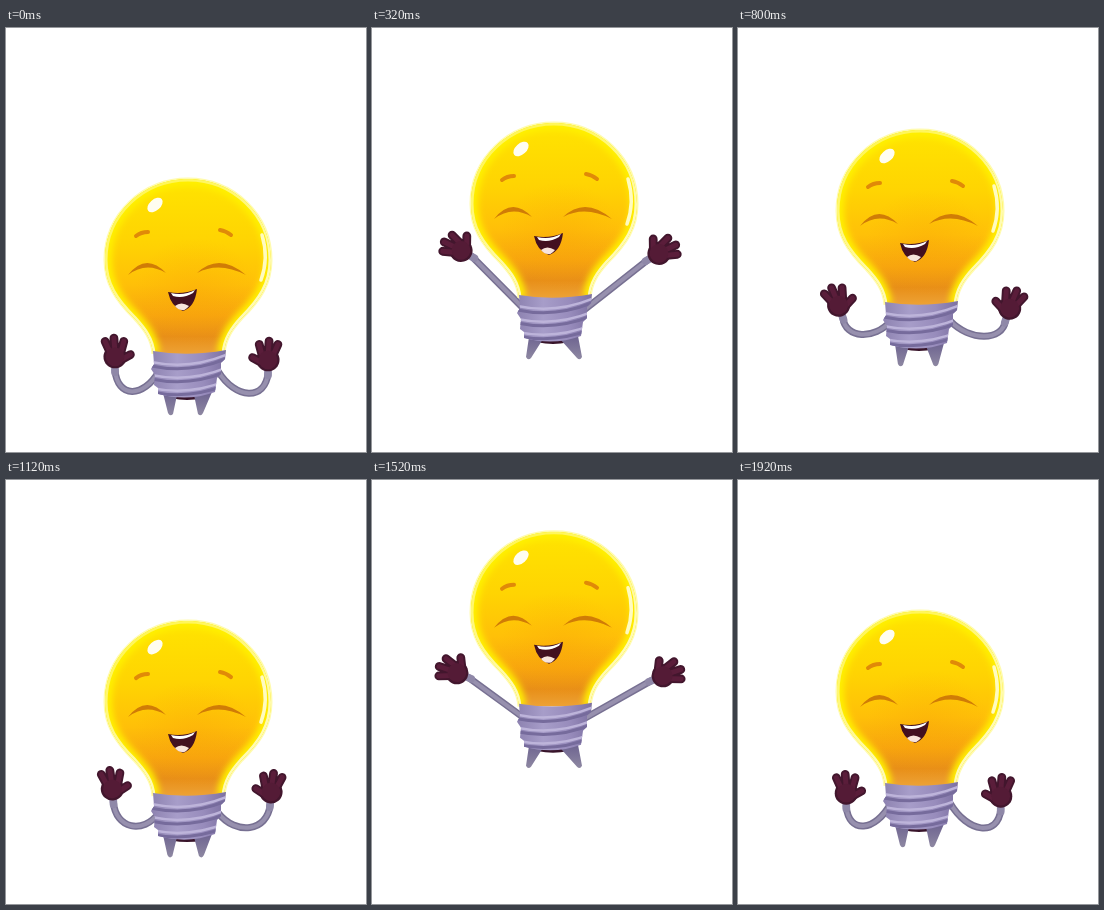
Write an HTML page that moves like this. It is 360 px wide and 424 px high and loops after 2000 ms.

```html
<!DOCTYPE html>
<html lang="en">
<head>
<meta charset="utf-8">
<title>Jumping light bulb</title>
<style>
  html, body { margin: 0; width: 100%; height: 100%; overflow: hidden; background: #fff; }
  svg { display: block; width: 100vw; height: 100vh; }
  .round { fill: none; stroke-linecap: round; stroke-linejoin: round; }
</style>
</head>
<body>
<svg viewBox="0 0 360 424">
  <defs>
    <path id="glass" d="M147 176C146 161 138 151 128 140C110 122 99 106 99 82C99 36 137 1 182 1S265 36 265 82C265 106 254 122 236 140C226 151 219 161 218 176"/>
    <path id="collar" d="M147 173Q182 179 220 172L219 181L215 185L215 196L211 200L209 214Q182 224 152 216L152 210L148 207L149 197L145 191L148 186Z"/>
    <path id="fingers" d="M-4 -15L-9 -26M0 -16L-1 -29M5 -15L8 -26M5 -9L14 -14"/>
    <clipPath id="inGlass"><use href="#glass"/></clipPath>
    <clipPath id="inCollar"><use href="#collar"/></clipPath>
    <filter id="soft" x="-20%" y="-20%" width="140%" height="140%"><feGaussianBlur stdDeviation="3"/></filter>
    <linearGradient id="gold" x1="0" y1="0" x2="0" y2="1">
      <stop offset="0" stop-color="#ffe400"/>
      <stop offset=".35" stop-color="#ffd402"/>
      <stop offset=".6" stop-color="#ffc008"/>
      <stop offset=".78" stop-color="#f8a60e"/>
      <stop offset=".9" stop-color="#e88f18"/>
      <stop offset="1" stop-color="#eda236"/>
    </linearGradient>
    <radialGradient id="amber">
      <stop offset="0" stop-color="#f79a08" stop-opacity=".25"/>
      <stop offset="1" stop-color="#f79a08" stop-opacity="0"/>
    </radialGradient>
    <linearGradient id="pale" x1="0" y1="0" x2=".5" y2="1">
      <stop offset=".2" stop-color="#fff65a"/>
      <stop offset=".8" stop-color="#fffbb4"/>
    </linearGradient>
    <linearGradient id="metal">
      <stop offset="0" stop-color="#8d82b0"/>
      <stop offset=".35" stop-color="#a79dc9"/>
      <stop offset=".7" stop-color="#988cbc"/>
      <stop offset="1" stop-color="#7d71a2"/>
    </linearGradient>
    <linearGradient id="leg" x1="0" y1="0" x2="0" y2="1">
      <stop offset="0" stop-color="#6d6390"/>
      <stop offset="1" stop-color="#8e88a2"/>
    </linearGradient>
    <g id="hand" class="round" transform="scale(1.1)">
      <path d="M0 2V-5" stroke="#8f88a8" stroke-width="7"/>
      <use href="#fingers" stroke="#42162d" stroke-width="8"/>
      <ellipse cy="-12" rx="10.5" ry="10.5" fill="#42162d"/>
      <use href="#fingers" stroke="#5a1d3a" stroke-width="4.5"/>
      <ellipse cy="-12" rx="8.5" ry="8.5" fill="#541b36"/>
    </g>
  </defs>

  <g id="arms" class="round"></g>

  <g id="body">
    <ellipse cx="181" cy="217" rx="20" ry="5" fill="#38142a"/>
    <path id="legs" fill="url(#leg)"/>

    <use href="#glass" fill="none" stroke="#fffbb0" stroke-width="3"/>
    <g clip-path="url(#inGlass)">
      <use href="#glass" fill="url(#gold)"/>
      <ellipse cx="190" cy="115" rx="62" ry="55" fill="url(#amber)"/>
      <use href="#glass" fill="none" stroke="#fff000" stroke-width="14" filter="url(#soft)"/>
      <use href="#glass" fill="none" stroke="url(#pale)" stroke-width="5"/>
      <path class="round" d="M256 57Q263 80 255 102" stroke="#fffbc0" stroke-width="3.5"/>
    </g>
    <ellipse cx="149" cy="27" rx="9" ry="5.5" transform="rotate(-42 149 27)" fill="#fffdf0"/>

    <path class="round" d="M130 58Q135 54 142 54M214 52Q220 53 225 57" stroke="#e08a08" stroke-width="4"/>
    <g fill="#d07c06">
      <path d="M122 97Q140 74 160 95Q140 83 122 97Z"/>
      <path d="M191 95Q213 74 240 97Q213 83 191 95Z"/>
    </g>

    <path d="M162 114Q177 117 191 111Q189 129 177 133Q165 129 162 114Z" fill="#431020"/>
    <path d="M165 115Q178 118 189 112L187 115Q177 121 167 118Z" fill="#fff"/>
    <path d="M169 128Q175 123 183 128Q179 133 176 132Q172 132 169 128Z" fill="#f8e4dc"/>

    <use href="#collar" fill="url(#metal)"/>
    <g id="threads" clip-path="url(#inCollar)" class="round"></g>
  </g>
</svg>
<script>
  const STEP = 80, LOOP = 2000;

  // Time and height of the glass top: ground, rise, peak and fall of two jumps.
  const path = [[0, 150], [320, 94], [500, 51], [800, 101],
                [1010, 150], [1360, 92], [1530, 51], [1920, 130]];

  const $ = id => document.getElementById(id);
  const make = (parent, name, attrs) => {
    const el = document.createElementNS("http://www.w3.org/2000/svg", name);
    for (const key in attrs) el.setAttribute(key, attrs[key]);
    return $(parent).appendChild(el);
  };
  const mix = (a, b, k) => a + (b - a) * k;
  const smooth = (from, to, v) => {
    const k = Math.min(1, Math.max(0, (v - from) / (to - from)));
    return k * k * (3 - 2 * k);
  };

  for (let y = 184; y < 215; y += 13) {
    const curve = dy => `M145 ${y + dy}Q183 ${y + dy + 8} 220 ${y + dy - 7}`;
    make("threads", "path", { d: curve(4), stroke: "#766b9c", "stroke-width": 3 });
    make("threads", "path", { d: curve(0), stroke: "#bdb4da", "stroke-width": 2.5 });
  }

  const arms = [1, -1].map(side => ({
    side,
    dark: make("arms", "path", { stroke: "#777092", "stroke-width": 7 }),
    light: make("arms", "path", { stroke: "#9790ae", "stroke-width": 4 }),
    hand: make("arms", "use", { href: "#hand" })
  }));

  // Key point by index, wrapping around the loop.
  function key(i) {
    const n = path.length, turn = Math.floor(i / n);
    const [t, y] = path[i - turn * n];
    return [t + turn * LOOP, y];
  }

  // Smooth curve through the key points.
  function heightAt(t) {
    const i = path.findLastIndex(p => p[0] <= t);
    const [a, b, c, d] = [-1, 0, 1, 2].map(n => key(i + n));
    const span = c[0] - b[0], u = (t - b[0]) / span;
    const slope = (p, q) => (q[1] - p[1]) / (q[0] - p[0]) * span;
    return mix(b[1], c[1], u * u * (3 - 2 * u))
      + u * (1 - u) ** 2 * slope(a, c) - u * u * (1 - u) * slope(b, d);
  }

  function draw(time) {
    const t = Math.floor((time % LOOP) / STEP) * STEP;
    const top = heightAt(t);
    const phase = t / 1000 % 1;
    const raise = smooth(.08, .32, phase) * (1 - smooth(.68, .86, phase));
    const lag = smooth(.36, .64, phase);
    const spread = Math.sin(Math.PI * phase) ** 2;

    $("body").setAttribute("transform", `translate(0 ${top})`);

    const l = 164 - 8 * raise, r = 195 + 13 * raise;
    $("legs").setAttribute("d",
      `M157 215L171 217L${l + 3} 236Q${l} 239 ${l - 2} 235Z` +
      `M188 217L206 214L${r + 2} 235Q${r} 239 ${r - 3} 236Z`);

    const x = 109 - 12 * spread;
    const y = mix(192 - 9 * Math.sin(2 * Math.PI * phase), 135 + 20 * lag, raise);
    const angle = -raise * (60 + 12 * lag);
    const droop = 28 * (1 - raise);

    for (const { side, dark, light, hand } of arms) {
      const left = side > 0;
      const wx = left ? x : 371 + 5 * raise - x;
      const wy = top + y + (left ? 0 : 3);
      const sx = left ? 153 : 212;
      const sy = top + 193 - 5 * raise;
      const bend = k => `${mix(sx, wx, k)} ${mix(sy, wy, k) + droop}`;
      const d = `M${sx} ${sy}C${bend(.35)} ${bend(.95)} ${wx} ${wy}`;
      dark.setAttribute("d", d);
      light.setAttribute("d", d);
      hand.setAttribute("transform",
        `translate(${wx} ${wy}) scale(${side} 1) rotate(${angle})`);
    }
  }

  const start = performance.now();
  function tick() {
    draw(performance.now() - start);
    requestAnimationFrame(tick);
  }
  tick();
</script>
</body>
</html>
```
